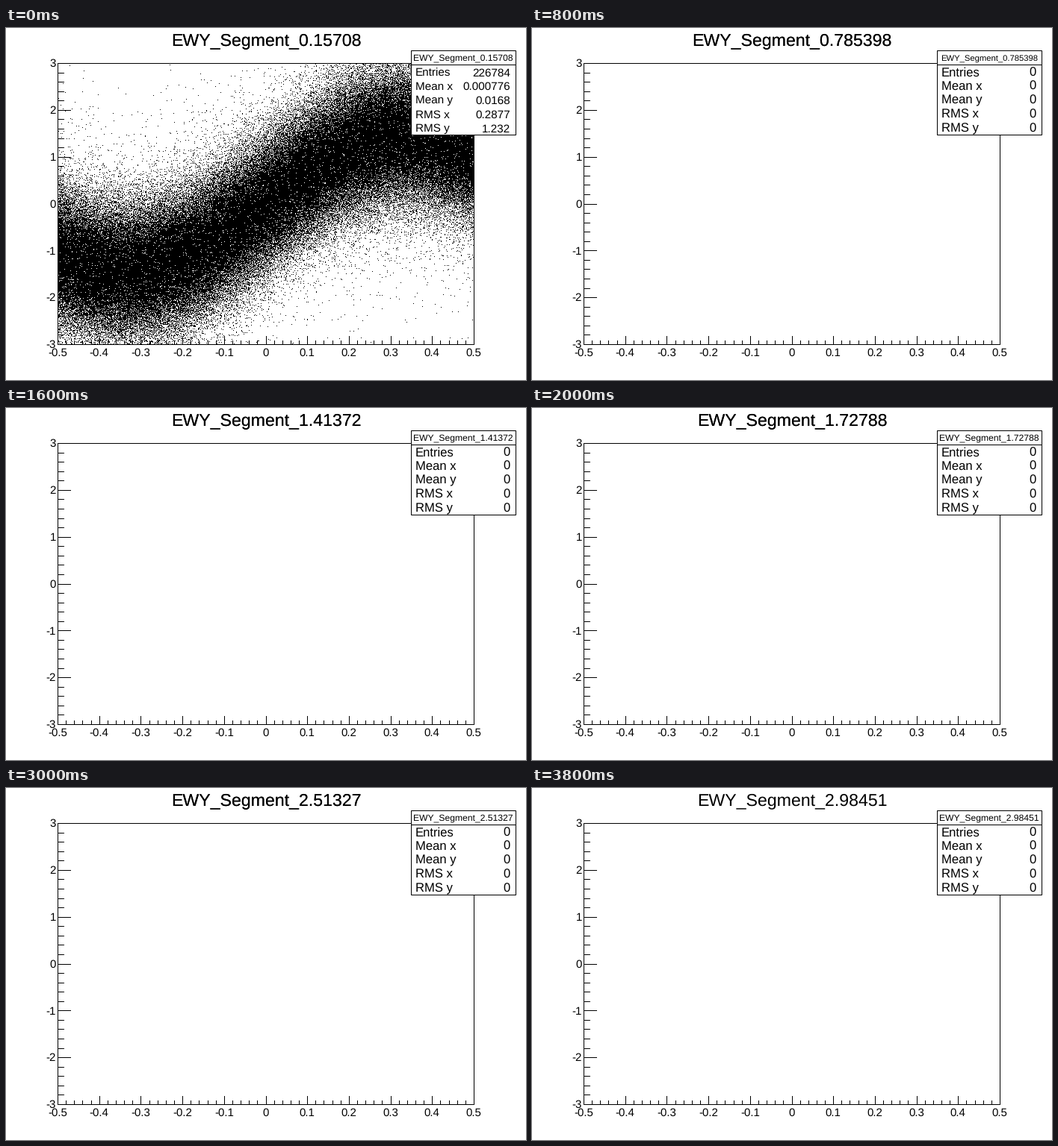
Write a matplotlib script that moves like this. It is 696 px wide and 472 px high and loops after 3.9 s.

```python
import matplotlib.pyplot as plt
import numpy as np
from matplotlib.animation import FuncAnimation
from matplotlib.patches import Rectangle

W, H, DPI = 696, 472, 64
PX = 72 / DPI  # points per pixel
LEFT, RIGHT, TOP, BOTTOM = 69, 626, 47, 424
STEPS = 20

plt.rcParams.update({
    "font.family": "Liberation Sans",
    "text.hinting": "no_hinting",
    "toolbar": "None",
})

fig = plt.figure(figsize=(W / DPI, H / DPI), dpi=DPI, facecolor="white")
ax = fig.add_axes([0, 0, 1, 1])
ax.axis("off")


def px(x):
    return LEFT + (x + 0.5) * (RIGHT - LEFT)


def py(y):
    return TOP + (3 - y) * (BOTTOM - TOP) / 6


def label(x, y, text, size, ha="center", z=3):
    return ax.text(x, y, text, fontsize=size * PX, ha=ha, va="baseline",
                   color="black", zorder=z)


def line(x0, y0, x1, y1, z=2):
    # Pixel centres, unsnapped, so that each line fills one pixel row
    ax.plot([x0 + 0.5, x1 + 0.5], [y0 + 0.5, y1 + 0.5], color="black", lw=PX,
            zorder=z, solid_capstyle="projecting", snap=False)


def box(x0, y0, x1, y1, fill, z):
    ax.add_patch(Rectangle((x0 + 0.5, y0 + 0.5), x1 - x0, y1 - y0, fc=fill,
                           ec="black", lw=PX, zorder=z, joinstyle="miter",
                           snap=False))


def scatter_image(n=226784):
    rng = np.random.default_rng(4)
    x = rng.uniform(-0.5, 0.5, n)
    spread = np.where(rng.random(n) < 0.06, 1.35, 0.69)
    y = 1.45 * np.sin(2 * np.pi * x / 1.37) + spread * rng.standard_normal(n)
    keep = np.abs(y) < 3
    img = np.ones((H, W))
    img[py(y[keep]).astype(int), px(x[keep]).astype(int)] = 0
    return img


cloud = ax.imshow(scatter_image(), cmap="gray", vmin=0, vmax=1, aspect="auto",
                  extent=(0, W, H, 0), interpolation="nearest", zorder=1)
ax.set_xlim(0, W)
ax.set_ylim(H, 0)

# Frame and ticks
box(LEFT, TOP, RIGHT, BOTTOM, "none", 2)
for i in range(51):
    x = round(px(i / 50 - 0.5))
    line(x, BOTTOM, x, BOTTOM - (11 if i % 5 == 0 else 5))
for i in range(31):
    y = round(py(i / 5 - 3))
    line(LEFT, y, LEFT + (17 if i % 5 == 0 else 8), y)
for i in range(-5, 6):
    label(px(i / 10), 440, f"{i / 10:g}", 15)
for v in range(-3, 4):
    label(67, round(py(v) + 5.2), str(v), 15, "right")

# Statistics box
box(542, 30, 682, 143, "white", 4)
line(542, 49, 682, 49, 5)
NAMES = ["Entries", "Mean x", "Mean y", "RMS x", "RMS y"]
FILLED = ["226784", "0.000776", "0.0168", "0.2877", "1.232"]
BASES = [65, 83, 102, 121, 140]
names = [label(548, b - n.endswith("y"), n, 16.6, "left", 5)
         for n, b in zip(NAMES, BASES)]
values = [label(675, b, "0", 16.6, "right", 5) for b in BASES]
stat_title = label(612, 44, "", 12.1, z=5)

# The heading is overprinted, except on the last step
titles = [label(348, 23, "", 23.1) for _ in range(2)]


def update(i):
    step = i // 2
    filled = step == 0
    name = f"EWY_Segment_{min(step + 1, STEPS - 1) * np.pi / STEPS:.6g}"
    for t in titles:
        t.set_text(name)
    titles[1].set_visible(step < STEPS - 1)
    stat_title.set_text(name)
    stat_title.set_fontsize((11.2 if len(name) > 19 else 12.1) * PX)
    cloud.set_visible(filled)
    for t in names + values:
        t.set_fontsize((15.3 if filled else 16.6) * PX)
    for t, v in zip(values, FILLED):
        t.set_text(v if filled else "0")
    return [cloud, stat_title, *titles, *names, *values]


anim = FuncAnimation(fig, update, frames=39, interval=100, repeat=True,
                     repeat_delay=0, init_func=lambda: update(0))
plt.show()
```
